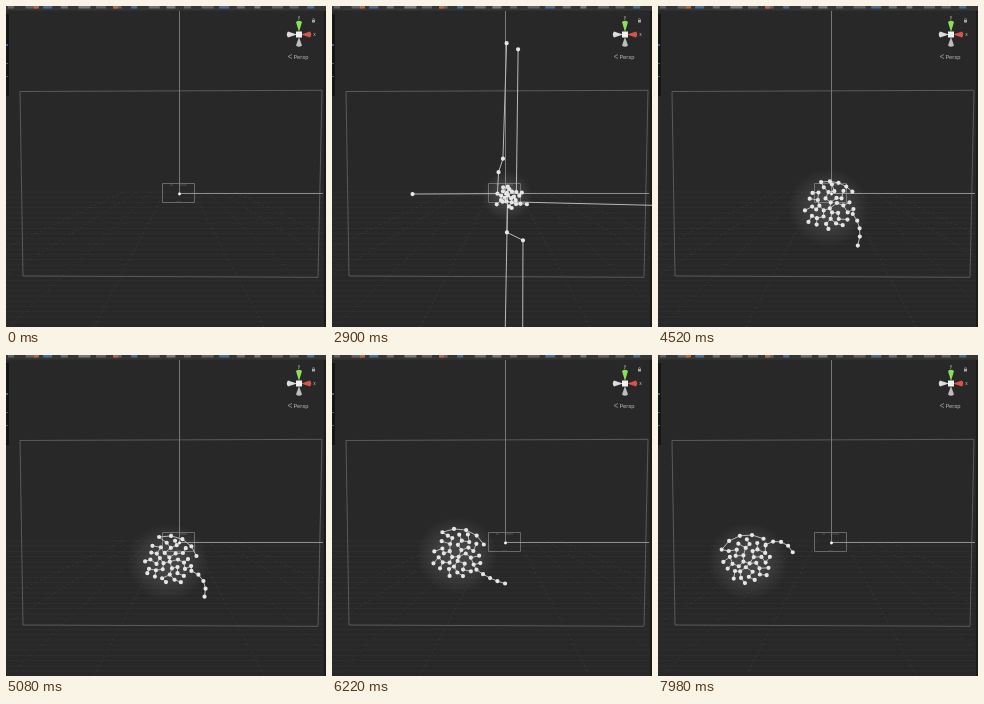
Animation, 320 px wide and 321 px high, one loop 8000 ms. Source, as an HTML page:

```html
<!DOCTYPE html>
<html lang="en">
<head>
<meta charset="utf-8">
<title>Node cluster in a scene view</title>
<style>
html, body { margin: 0; width: 100%; height: 100%; overflow: hidden; background: #282828; }
svg { display: block; width: 100%; height: 100%; }
text { font-family: "Roboto", "Liberation Sans", sans-serif; fill: #b4b4b4; }
</style>
</head>
<body>
<svg viewBox="0 0 320 321" preserveAspectRatio="none">
  <defs>
    <radialGradient id="halo">
      <stop offset=".3" stop-color="#fff" stop-opacity=".13"/>
      <stop offset=".7" stop-color="#fff" stop-opacity=".06"/>
      <stop offset="1" stop-color="#fff" stop-opacity="0"/>
    </radialGradient>
  </defs>
  <rect width="320" height="321" fill="#282828"/>
  <g fill="none" stroke="#fff" stroke-width=".8">
    <path id="rows" stroke-opacity=".035"/>
    <path id="fan" stroke-opacity=".08" stroke-dasharray="2 3"/>
  </g>
  <g id="bar"><rect width="320" height="4.500" fill="#363636"/></g>
  <path d="M0 8h3v82h-3z" fill="#151515"/>
  <path d="M0 38h2v2h-2zM0 57h2v1h-2zM0 70h2v1h-2z" fill="#35608c"/>
  <path d="M318 5h2v316h-2z" fill="#1b1b1b"/>
  <g fill="none" stroke="#606060" stroke-width=".9">
    <path d="M14 85.500L316 84.300L312 271.300L17 270Z"/>
    <path d="M156.500 177.500h32v19h-32z" stroke="#707070"/>
    <path d="M164 179h3M173 179h8M170 196h5" stroke-width=".7"/>
    <path d="M173.500 5V188" stroke="#808080"/>
    <path d="M173.500 187.500H317" stroke="#9a9a9a"/>
  </g>
  <g id="gizmo">
    <path d="M293 26L290 16Q293 13.500 296 16Z" fill="#8be05a"/>
    <path d="M295 28.500L304 25.500Q306.500 28.500 304 31.500Z" fill="#d9534a"/>
    <path d="M291 28.500L282 25.500Q279.500 28.500 282 31.500Z" fill="#dcdcdc"/>
    <path d="M293 31L290 39.500Q293 42 296 39.500Z" fill="#bdbdbd"/>
    <path d="M290 25.500h6v6h-6z" fill="#f2f2f2"/>
    <text x="293" y="13" font-size="5" text-anchor="middle">y</text>
    <text x="308.500" y="30" font-size="5" text-anchor="middle">x</text>
    <path d="M306 14h3v2.500h-3z" fill="#a5a5a5"/>
    <path d="M306.600 14v-1a1 1 0 0 1 1.800 0V14" fill="none" stroke="#a5a5a5" stroke-width=".6"/>
    <path d="M286 48.500l-4 2l4 2" fill="none" stroke="#999" stroke-width=".8"/>
    <text x="287.500" y="52.600" font-size="5.800">Persp</text>
  </g>
  <circle cx="173.500" cy="188" r="1.400" fill="#fff"/>
  <ellipse id="glow" fill="url(#halo)"/>
  <path id="links" fill="none" stroke="#b8b8b8"/>
  <path id="dots" fill="none" stroke="#e6e6e6" stroke-width="4.200" stroke-linecap="round"/>
</svg>
<script>
const LOOP = 8000, BURST = 1820, DRIFT = 3860;
const TAU = 150, FAR = 500, CORE = 38, CHAIN = 5;
const $ = id => document.getElementById(id);
const clamp = v => Math.min(1, Math.max(0, v));
const smooth = v => (v = clamp(v)) * v * (3 - 2 * v);
const gap = (a, b) => Math.hypot(a.x - b.x, a.y - b.y);
const nearest = (list, p) => list.reduce((best, q) => gap(q, p) < gap(best, p) ? q : best);
const polar = (a, r, s = r) => ({ x: r * Math.cos(a), y: s * Math.sin(a) });

function drawScene() {
  let rows = '', fan = '', icons = '';
  for (let y = 186; y < 321; y += 5.2) rows += `M0 ${y.toFixed(1)}H317`;
  for (let k = -4; k <= 4; k++) if (k) fan += `M${173 + k * 14} 186L${173 + k * 85} 321`;
  const tints = ['#777', '#777', '#5b87b5', '#888', '#999'];
  for (let i = 0; i < 18; i++) {
    icons += `<rect x="${2 + i * 17.6}" width="${6 + i * 5 % 7}" height="2.5" fill="${tints[i % 5]}" opacity=".7"/>`;
  }
  for (const x of [28, 107]) icons += `<rect x="${x}" width="5" height="2.5" fill="#b56a45"/>`;
  $('rows').setAttribute('d', rows);
  $('fan').setAttribute('d', fan);
  $('bar').innerHTML += icons;
}

// Arms that grow outwards from the hub by a constant ratio
function growArms() {
  const hub = { x: 0, y: 0 }, nodes = [hub];
  const arm = (x, y, count, gx, gy, parent) => {
    for (let j = 0; j < count; j++) {
      const node = { x: x * gx ** j, y: y * gy ** j, parent };
      nodes.push(node);
      parent = node;
    }
  };
  for (const [x, y, count] of [[0, -7.2, 4], [0, 7.2, 2], [7.2, 0, 2], [-7.2, 0, 4]]) arm(x, y, count, 3, 3, hub);
  const stem = nodes.filter(n => !n.x);
  for (const [x, y, count] of [[11, 8, 1], [-11.5, -9, 2], [-34.5, -33, 2]]) {
    arm(x, y, count, 5, 1.15, nearest(stem, { x, y }));
  }
  return nodes.sort((a, b) => gap(a, hub) - gap(b, hub));
}

function buildCore() {
  const nodes = growArms(), early = nodes.length;
  const free = Array.from({ length: CORE }, (_, i) => polar(i * 2.39996, Math.sqrt((i + .3) / CORE)));
  const taken = [];
  for (let i = 0; i < CORE; i++) {
    const n = nodes[i] || (nodes[i] = { x: 0, y: 0 });
    n.slot = n.parent ? nearest(free, n.parent.slot) : free[0];
    free.splice(free.indexOf(n.slot), 1);
    if (i >= early) n.parent = taken[taken.map(m => m.slot).indexOf(nearest(taken.map(m => m.slot), n.slot))];
    taken.push(n);

    const d = Math.hypot(n.x, n.y);
    const settled = d < 25;
    if (i >= early) {
      n.dir = polar(Math.PI * (1 + i % 4 / 2), 1);
      n.start = BURST + 10 + (i - early) * 80;
    } else if (settled) {
      const flat = Math.abs(n.x) >= Math.abs(n.y);
      n.dir = { x: flat ? Math.sign(n.x) : 0, y: flat ? 0 : Math.sign(n.y) };
      n.start = 80 + Math.max(0, i - 1) * 95;
    } else {
      n.dir = { x: n.x / d, y: n.y / d };
      n.start = BURST - TAU * Math.log(FAR / d);
    }
    n.home = settled ? { x: n.x, y: n.y } : { x: 0, y: 0 };
  }
  return nodes;
}

// Time, centre, then the tail's rim angle, heading and bend
const keys = [
  [BURST, 173.5, 188, .2, 1.6, 0],
  [DRIFT, 175, 193, .2, 1.6, .05],
  [5080, 162, 207, .4, .5, .4],
  [6220, 125, 200, .7, .6, -.1],
  [7040, 115, 203, -.5, .9, .1],
  [7980, 90, 206, -.8, -.4, .45]
];

function poseAt(t) {
  const last = keys.length - 1;
  const i = Math.min(last - 1, Math.max(0, keys.findLastIndex(k => k[0] <= t)));
  const [p, a, b, q] = [i - 1, i, i + 1, i + 2].map(k => keys[Math.min(last, Math.max(0, k))]);
  const u = clamp((t - a[0]) / (b[0] - a[0]));
  const [x, y, angle, heading, bend] = a.map((v, j) => {
    const m = (b[j] - p[j]) / 2, n = (q[j] - v) / 2;
    return v + (b[j] - v) * smooth(u) + m * u * (1 - u) ** 2 - n * u * u * (1 - u);
  }).slice(1);
  const r = 24 * Math.sqrt(clamp((t - BURST) / 2700));
  return { x, y, rx: r * 1.06, ry: r * .95, angle, heading, bend };
}

function coreAt(t, pose) {
  const spin = (t - DRIFT) * .0002, cos = Math.cos(spin), sin = Math.sin(spin);
  const hold = 1 - smooth((t - BURST) / 700);
  return core.map(({ slot, home, dir, start }, i) => {
    const d = FAR * Math.exp(-Math.max(0, t - start) / TAU);
    const sway = polar(t / 300 + i * 2.1, .04);
    return {
      x: pose.x + pose.rx * (slot.x * cos - slot.y * sin + sway.x) + home.x * hold + dir.x * d,
      y: pose.y + pose.ry * (slot.x * sin + slot.y * cos + sway.y) + home.y * hold + dir.y * d
    };
  });
}

// Late nodes fly in from one side, each later than the one before
function flyIn(points, t, side) {
  return points.map((p, j) => ({ x: p.x, y: p.y, lag: .07 * 6.5 ** j * Math.exp((DRIFT - t) / TAU) }))
    .filter(p => p.lag < FAR)
    .map(p => ({ x: p.x, y: p.y + side * p.lag }));
}

function tailAt(t, pose) {
  const rim = polar(pose.angle, pose.rx, pose.ry), points = [];
  let p = { x: pose.x + rim.x, y: pose.y + rim.y };
  for (let j = 0; j < CHAIN; j++) {
    points.push(p);
    const step = polar(pose.heading + pose.bend * j, 8);
    p = { x: p.x + step.x, y: p.y + step.y };
  }
  return flyIn(points, t, 1);
}

function crestAt(t, pose) {
  const p = clamp((t - DRIFT) / (LOOP - DRIFT));
  const first = -1.8 - .9 * p * p, step = .2 + .22 * smooth(p * 3);
  const points = Array.from({ length: CHAIN }, (_, j) => {
    const rim = polar(first + step * j, pose.rx * 1.15, pose.ry * 1.15);
    return { x: pose.x + rim.x, y: pose.y + rim.y };
  });
  return flyIn(points, t, -.5);
}

function draw(t) {
  const pose = poseAt(t), spots = coreAt(t, pose);
  const at = p => p.x.toFixed(2) + ' ' + p.y.toFixed(2);
  let links = '', dots = '';
  const add = (p, from) => {
    dots += `M${at(p)}h.01`;
    if (from) links += `M${at(from)}L${at(p)}`;
  };
  core.forEach((n, i) => {
    if (t >= n.start) add(spots[i], n.parent && spots[core.indexOf(n.parent)]);
  });
  for (const chain of [tailAt(t, pose), crestAt(t, pose)]) {
    chain.forEach((p, j) => add(p, j ? chain[j - 1] : nearest(spots, p)));
  }
  $('links').setAttribute('d', links);
  $('dots').setAttribute('d', dots);
  const halo = { cx: pose.x, cy: pose.y, rx: pose.rx * 1.6, ry: pose.ry * 1.7 };
  for (const k in halo) $('glow').setAttribute(k, halo[k]);
}

drawScene();
const core = buildCore();
const begin = performance.now();
function tick() {
  draw((performance.now() - begin) % LOOP);
  requestAnimationFrame(tick);
}
tick();
</script>
</body>
</html>
```
